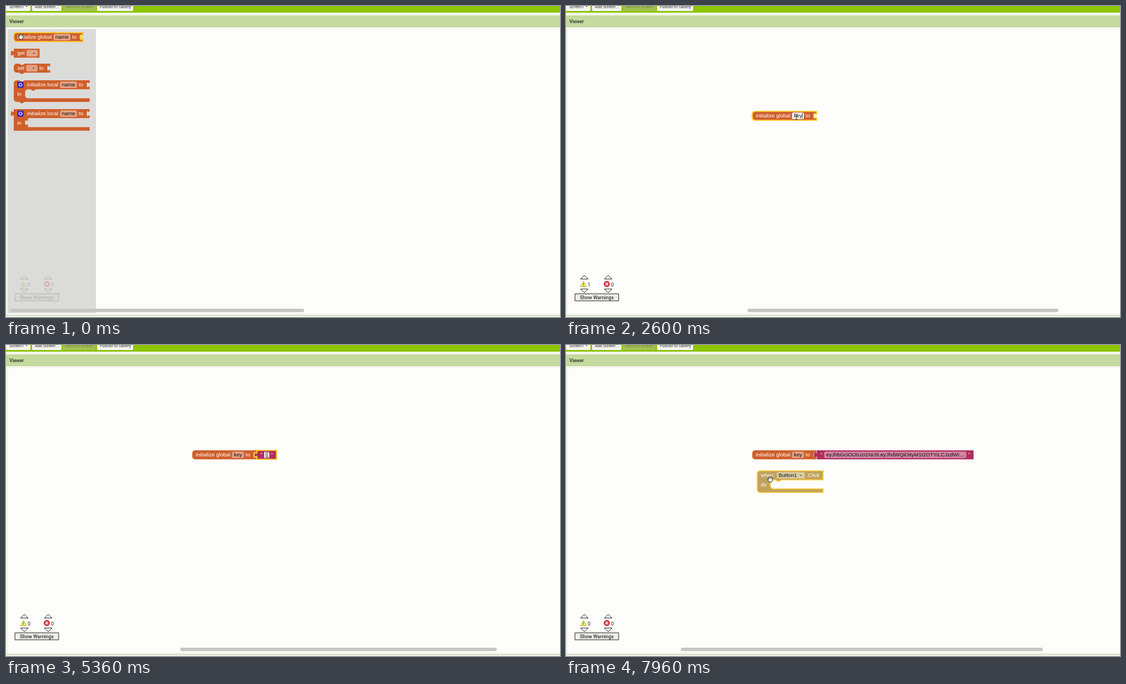
Animation of 998x561 px, one loop 8000 ms. Source, as an HTML page with a canvas:

```html
<!DOCTYPE html>
<html lang="en">
<head>
<meta charset="utf-8">
<title>Block editor</title>
<style>
  html, body { margin: 0; width: 100%; height: 100%; overflow: hidden; background: #fdfdfb; }
  canvas { display: block; }
</style>
</head>
<body>
<canvas id="stage" width="998" height="561"></canvas>
<script>
const ctx = document.getElementById('stage').getContext('2d');
const LOOP = 8000, SCALE = 0.65, ROW = 25, PAD = 10, ARROW = 17;
const ORANGE = '#cf5f2c', PINK = '#b32d5e', GOLD = '#b18e35', GREEN = '#439970', DARK = '#1f6640';
const UI_FONT = 'Roboto, sans-serif';
const BLOCK_FONT = '14.67px "Liberation Sans", Arial, sans-serif';

// Connector outlines, in block units.
const TAB_DOWN = 'c0,10 -8,-8 -8,7.5 s8,-2.5 8,7.5';
const TAB_UP = 'c0,-10 -8,8 -8,-7.5 s8,2.5 8,-7.5';
const NOTCH = 'l6,4 3,0 6,-4', NOTCH_BACK = 'l-6,4 -3,0 -6,-4';

// Field prefixes: "[" editable, "^" drop-down, "*" gear, "#" inline socket.
// Row inputs: "value", "body" (statements), "result" (indented value).
const row = (fields, input) => ({ fields, input });
const block = (color, shape, ...rows) => ({ color, shape, rows });
const value = (...fields) => row(fields, 'value');

const globalVar = name => block(ORANGE, 'hat', value('initialize global', '[' + name, 'to'));
const textBlock = text => block(PINK, 'output', row(['"', '[' + text, '"']));
const pink = (...rows) => block(PINK, 'output', ...rows);
const eventBlock = name => block(GOLD, 'hat',
  row(['when ', '^Button1', '.' + name]), row(['do'], 'body'));
const getter = name => block(GREEN, 'output', row(['^Button1', '.', '^' + name]));
const setter = name => block(DARK, 'stack', value('set ', '^Button1', '.', '^' + name, ' to'));
const local = (shape, input) => block(ORANGE, shape,
  value('*', 'initialize local', '[name', 'to'), row(['in'], input));

const flyouts = {
  variables: { right: 162, items: [
    [48, globalVar('name')],
    [77, block(ORANGE, 'output', row(['get', '^ ']))],
    [104, block(ORANGE, 'stack', value('set', '^ ', 'to'))],
    [134, local('stack', 'body')],
    [186, local('output', 'result')]
  ] },
  text: { right: 205, thumb: 460, items: [
    [48, textBlock(' ')],
    [75.5, pink(value('*', 'join'), value())],
    [118.5, pink(value('length'))],
    [145, pink(value('is empty'))],
    [172, { ...pink(row(['compare texts', '#', '^<', '#'])), rowHeight: 35 }],
    [205, pink(value('trim'))],
    [232, pink(value('^upcase'))],
    [259, pink(value('starts at', 'text'), value('piece'))],
    [302, pink(value('^contains', 'text'), value('piece'))],
    [344.7, pink(value('^split', 'text'), value('at'))],
    [387.5, pink(value('split at spaces'))],
    [414, pink(value('segment', 'text'), value('start'), value('length'))],
    [473, pink(value('replace all text'), value('segment'), value('replacement'))],
    [532, pink(row(['Obfuscated Text "', '[ ', '"']))]
  ] },
  button: { right: 275, thumb: 279, items: [
    ...['Click', 'GotFocus', 'LongClick', 'LostFocus', 'TouchDown', 'TouchUp']
      .map((name, i) => [48 + 50.7 * i, eventBlock(name)]),
    ...['BackgroundColor', 'Enabled', 'FontBold', 'FontItalic']
      .flatMap((name, i) => [[352 + 57.1 * i, getter(name)], [379 + 57.1 * i, setter(name)]])
  ] }
};

function rect(x, y, w, h, fill, radius = 0) {
  ctx.fillStyle = fill;
  ctx.beginPath();
  ctx.roundRect(x, y, w, h, radius);
  ctx.fill();
}

function label(text, x, y, font, fill) {
  ctx.font = font;
  ctx.fillStyle = fill;
  ctx.fillText(text, x, y);
}

function shape(path, fill, stroke, width = 1) {
  const p = new Path2D(path);
  if (fill) { ctx.fillStyle = fill; ctx.fill(p, 'evenodd'); }
  if (stroke) { ctx.strokeStyle = stroke; ctx.lineWidth = width; ctx.stroke(p); }
}

function fieldWidth(field) {
  if (field === '*') return 17;
  if (field === '#') return 22;
  if (field[0] === '^') return ctx.measureText(field.slice(1)).width + ARROW;
  return ctx.measureText(field.replace('[', '')).width;
}

function rowWidth({ fields, input }) {
  const content = fields.reduce((sum, f) => sum + fieldWidth(f) + PAD, PAD);
  return content + (input === 'value' ? 8 : 0);
}

function outline(b, width, height) {
  let path = b.shape === 'output' ? 'M0,0' : 'M0,8 a8,8 0 0 1 8,-8';
  if (b.shape === 'stack') path += 'h7' + NOTCH;
  let y = 0, bottom = 0;
  for (const r of b.rows) {
    const slot = rowWidth(r);
    bottom = y + height;
    if (r.input === 'body') {
      path += `H${slot + 30}${NOTCH_BACK}h-7 a8,8 0 0 0 -8,8 V${bottom - 8} a8,8 0 0 0 8,8 H${width}`;
    } else if (r.input === 'result') {
      path += `H${slot + 8}v5${TAB_DOWN}V${bottom}H${width}`;
    } else {
      path += `H${width}` + (r.input ? 'v5' + TAB_DOWN : '') + `V${bottom}`;
    }
    if (r.input === 'body' || r.input === 'result') path += `V${bottom += 10}`;
    y = bottom;
  }
  if (b.shape === 'stack') path += 'H30' + NOTCH_BACK;
  return path + (b.shape === 'output' ? `H0V20${TAB_UP}z` : `H8a8,8 0 0 1 -8,-8z`);
}

function drawGear(x, middle) {
  rect(x, middle - 8.5, 17, 17, '#3a22b4', 3);
  ctx.strokeStyle = '#e4e0f6';
  ctx.lineWidth = 1.7;
  ctx.beginPath();
  ctx.arc(x + 8.5, middle, 3.6, 0, 7);
  for (let i = 0; i < 6; i++) {
    const c = Math.cos(i * Math.PI / 3), s = Math.sin(i * Math.PI / 3);
    ctx.moveTo(x + 8.5 + 4 * c, middle + 4 * s);
    ctx.lineTo(x + 8.5 + 5.8 * c, middle + 5.8 * s);
  }
  ctx.stroke();
}

function drawField(field, x, middle, edit) {
  const kind = field[0], width = fieldWidth(field);
  if (kind === '#') return;
  if (kind === '*') return drawGear(x, middle);
  const boxed = kind === '[' || kind === '^', text = boxed ? field.slice(1) : field;
  const editing = kind === '[' && edit;
  if (boxed) rect(x - 5, middle - 9, width + 10, 18, editing ? '#fff' : 'rgba(255,255,255,.42)', 4);
  if (editing === 'select') rect(x, middle - 8, width, 16, '#3390ff');
  label(text, x, middle + 5, BLOCK_FONT, boxed && editing !== 'select' ? '#111' : '#fff');
  if (editing === 'caret') rect(x + (text === ' ' ? -1 : width), middle - 8, 1.3, 16, '#111');
  if (kind === '^') shape(`M${x + width - 8.5},${middle - 1.5}h5l-2.5,4z`, '#444');
}

function drawBlock(b, x, y, { selected, dragging, edit } = {}) {
  ctx.save();
  ctx.translate(x, y);
  ctx.scale(SCALE, SCALE);
  ctx.font = BLOCK_FONT;
  const height = b.rowHeight || ROW;
  const width = Math.max(...b.rows.map(rowWidth));
  let path = outline(b, width, height);
  const placed = [];
  b.rows.forEach((r, i) => {
    let fx = i && r.input === 'value' ? width - rowWidth(r) + PAD : PAD;
    for (const f of r.fields) {
      placed.push([f, fx, (i + 0.5) * height]);
      if (f === '#') path += `M${fx + 8},5h14v25h-14v-5${TAB_UP}z`;
      fx += fieldWidth(f) + PAD;
    }
  });
  if (dragging) ctx.globalAlpha = 0.8;
  shape(path, b.color, selected && '#fc3', 3.4);
  ctx.globalAlpha = 1;
  for (const [f, fx, middle] of placed) drawField(f, fx, middle, edit);
  ctx.restore();
}

function drawPage() {
  rect(0, 0, 998, 561, '#f3f6e9');
  rect(0, 0, 998, 12, '#8fc400');
  const buttons = [[0, 44, 'Screen1', 6], [47, 53, 'Add Screen ...', 52],
    [103, 58, 'Remove Screen', 107], [164, 65, 'Publish to Gallery', 169]];
  buttons.forEach(([x, w, text, tx], i) => {
    rect(x, -10, w, 19, i === 2 ? '#a2c054' : '#f4f4f1', 2);
    label(text, tx, 3.5, '7.25px ' + UI_FONT, i === 2 ? '#6f873a' : '#333');
  });
  shape('M35,-1h4l-2,3z', '#333');
  rect(0, 17, 998, 21, '#c5da9f');
  rect(0, 37, 998, 1, '#b8cf93');
  label('Viewer', 6, 30.5, 'bold 8.4px ' + UI_FONT, '#3c4433');
  rect(4, 41.5, 994, 513.5, '#fdfdfb');
  rect(0, 557.5, 998, 1.5, '#d0d2c9');
}

function drawWarnings(count) {
  for (const x of [26, 69]) {
    shape(`M${x},492.5l7,-6.5 7,6.5z M${x},510.5l7,6.5 7,-6.5z`, '#fff', '#222');
  }
  shape('M31.5,496.5l5.3,10h-10.6z', '#f2ea5e', '#aaa03c', 0.8);
  rect(31, 500, 1, 3.3, '#555');
  rect(31, 504.2, 1, 1, '#555');
  rect(68, 496, 11, 11, '#cf3945', 5.5);
  shape('M71.3,499.3l4.4,4.4m0,-4.4l-4.4,4.4', null, '#fff', 1.5);
  label(count, 39, 505.5, '9px ' + UI_FONT, '#222');
  label('0', 81, 505.5, '9px ' + UI_FONT, '#222');
  rect(15.5, 518.5, 80, 14, '#66665a');
  rect(17, 520, 77, 11, '#eeeeea');
  label('Show Warnings', 25, 528.7, '500 8.8px ' + UI_FONT, '#333');
}

function drawFlyout({ right, thumb, items }, hover) {
  ctx.save();
  ctx.beginPath();
  ctx.rect(3, 42, right - 3, 512);
  ctx.clip();
  rect(3, 42, right - 3, 512, 'rgba(212,212,210,.8)');
  if (thumb) rect(right - 9, 43, 6.5, thumb - 43, '#c0c0be', 3.2);
  items.forEach(([y, b], i) => drawBlock(b, 14, y, { selected: hover && i === 0 }));
  ctx.restore();
}

const cursors = {
  open: 'M-2.3,5L-4.6,1.2Q-5,-.5 -3.2,.3L-3.8,-2.6Q-3,-4.4 -2,-2.8Q-1.2,-5.4 0,-3.6Q1.4,-5.2 2,-2.8Q3.8,-3.8 3.9,-1.5Q4.4,2 2.6,5z',
  fist: 'M-2.2,4L-4,1 -3.6,-2Q-2.5,-3.8 -1.2,-2.8Q0,-3.8 1,-2.8Q2.5,-3.8 3.6,-2Q4.2,1 2.6,4z',
  beam: 'M-2.5,-5Q0,-5 0,-4Q0,-5 2.5,-5M0,-4V4M-2.5,5Q0,5 0,4Q0,5 2.5,5'
};

function drawCursor(kind, [x, y]) {
  ctx.save();
  ctx.translate(x, y);
  shape(cursors[kind], kind === 'beam' ? null : '#fff', '#111', 0.9);
  if (kind === 'open') shape('M-2,-2.8V0M0,-3.4V0M2,-2.8V0', null, '#333', 0.7);
  ctx.restore();
}

// Eased position along [time, x, y] keys.
function follow(t, keys) {
  const next = keys.findIndex(k => k[0] > t);
  if (next < 0) return keys[keys.length - 1].slice(1);
  if (next === 0) return keys[0].slice(1);
  const a = keys[next - 1], b = keys[next], u = (t - a[0]) / (b[0] - a[0]);
  const e = u * u * (3 - 2 * u);
  return [a[1] + (b[1] - a[1]) * e, a[2] + (b[2] - a[2]) * e];
}

// Latest [time, ...values] entry that has begun.
const latest = (t, steps) => steps.filter(s => s[0] <= t).pop().slice(1);

const TOKEN = 'eyJhbGciOiJIUzI1NiJ9.eyJhdWQiOiIyM1I2OTYiLCJzdWI…';
const scrollSteps = [[0, 7, 537], [440, 324, 894], [1080, 324, 886], [2600, 327, 887],
  [4120, 302, 900], [5100, 314, 884], [5600, 207, 859]];
const flyoutSteps = [[0, 'variables'], [440, null], [3440, 'text'], [3960, null],
  [6320, 'button'], [6880, null]];
const nameSteps = [[0, 'name'], [2280, 'k'], [2440, 'ke'], [2600, 'key']];
const nameEdits = [[0, null], [1720, 'select'], [2280, 'caret'], [2880, null]];
const textEdits = [[0, null], [5040, 'caret'], [5760, null]];
const cursorSteps = [[0, 'open'], [200, 'fist'], [1080, 'open'], [1280, 'beam'], [3040, 'open'],
  [3320, null], [3560, 'open'], [3840, 'fist'], [4760, 'beam'], [5800, 'open'], [6080, null],
  [6400, 'open'], [6800, 'fist'], [7900, 'open']];
const cursorPath = [[200, 27, 55], [440, 45, 66], [1080, 348, 197], [1320, 415, 198],
  [3040, 415, 200], [3300, 184, 46], [3560, 0, 62], [3800, 20, 57], [3880, 20, 57],
  [4240, 48, 139], [4760, 458, 199], [4860, 471, 198], [5760, 471, 198], [6080, 0, 330],
  [6400, 0, 200], [6560, 90, 83], [6640, 90, 83], [6800, 64, 77], [6880, 64, 77],
  [7160, 83.5, 92.5], [7960, 368, 242]];
const globalPath = [[200, 14, 48], [440, 32, 59], [1080, 335.5, 190]];
const textPath = [[3880, 14, 48], [4240, 42, 130], [4760, 452, 190]];
const eventPath = [[6880, 14, 48], [7160, 35.5, 63], [7960, 344.5, 227]];

function draw(t) {
  drawPage();
  drawWarnings(t >= 1080 && t < 4760 ? '1' : '0');

  if (t >= 440) {
    drawBlock(globalVar(latest(t, nameSteps)[0]), ...follow(t, globalPath),
      { selected: t < 3960, dragging: t < 1080, edit: latest(t, nameEdits)[0] });
  }
  if (t >= 3960) {
    drawBlock(textBlock(t < 5600 ? ' ' : TOKEN), ...follow(t, textPath),
      { selected: t < 6880, dragging: t < 4760, edit: latest(t, textEdits)[0] });
  }
  if (t >= 6880) {
    drawBlock(eventBlock('Click'), ...follow(t, eventPath), { selected: true, dragging: true });
  }

  const [open] = latest(t, flyoutSteps);
  const hover = t < 440 || (t >= 3760 && t < 3960) || t >= 6520;
  if (open) drawFlyout(flyouts[open], hover);

  const [left, right] = latest(t, scrollSteps);
  rect(left, 546, right - left, 6.3, '#c6c6c4', 3.1);

  const [cursor] = latest(t, cursorSteps);
  if (cursor) drawCursor(cursor, follow(t, cursorPath));
}

const start = performance.now();
function tick() {
  draw((performance.now() - start) % LOOP);
  requestAnimationFrame(tick);
}
tick();
</script>
</body>
</html>
```
